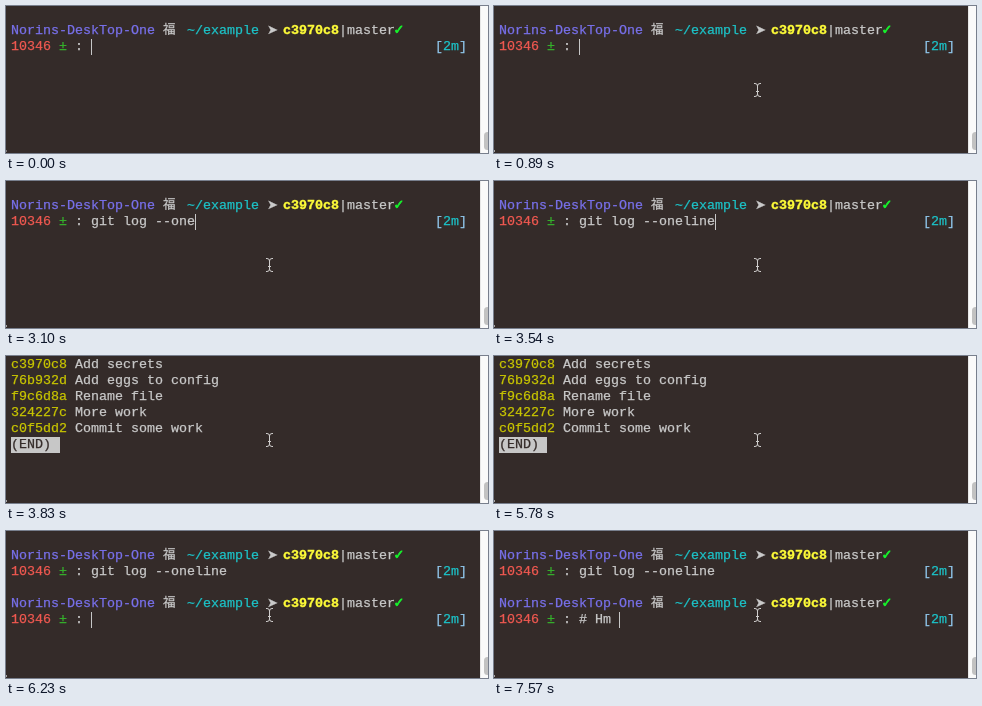
An HTML page for the animation above (8 s loop, 482x147 px).

```html
<!DOCTYPE html>
<html lang="en">
<head>
<meta charset="utf-8">
<title>Terminal session</title>
<style>
html, body { margin: 0; width: 100%; height: 100%; overflow: hidden; background: #342b29; }
svg { display: block; }
text { font: 13.333px "Liberation Mono", "Courier New", monospace; white-space: pre; stroke-width: .25px; }
.bold { font-weight: bold; stroke-width: .4px; }
.cjk { font: 500 12.5px "Noto Sans CJK JP", "Noto Sans CJK", sans-serif; }
.sym { font: 13px "DejaVu Sans", sans-serif; }
.check { font: bold 13px "DejaVu Sans", sans-serif; stroke-width: .8px; }
</style>
</head>
<body>
<svg id="stage" width="482" height="147" viewBox="0 0 482 147">
  <rect width="482" height="147" fill="#342b29"/>
  <rect x="474" width="8" height="147" fill="#fafafa"/>
  <rect x="474" width="1" height="147" fill="#e7e7e7"/>
  <rect x="478" y="126" width="10" height="18" rx="3.5" fill="#c2c2c2"/>
  <rect id="corner" y="144" width="1" height="2" fill="#c7c7c7"/>
  <g id="screen"></g>
  <path id="mouse" d="M260 77.5h1q2.5 0 2.5 2.5v8q0 2.5-2.5 2.5h-1M267 77.5h-1q-2.5 0-2.5 2.5v8q0 2.5 2.5 2.5h1M262 85.5h3" fill="none" stroke="#d0cecd"/>
  <rect id="caret" width="1" height="16" fill="#c7c7c7"/>
</svg>
<script>
const LOOP = 8000, CELL = 8, LINE = 16, LEFT = 5, TOP = 1;
const GREY = '#c9c9c9', YELLOW = '#c7c400', CYAN = '#1cc3c8', PALE = '#8fc6ea';
const $ = id => document.getElementById(id);
const colX = col => LEFT + col * CELL;
const rowY = row => TOP + row * LINE;

function text(col, row, str, color, cls = '') {
  return `<text x="${colX(col)}" y="${rowY(row) + 11}" fill="${color}" stroke="${color}" class="${cls}">${str}</text>`;
}

function prompt(row, command) {
  return text(0, row, 'Norins-DeskTop-One', '#7870ea')
    + text(19, row, '福', GREY, 'cjk')
    + text(22, row, '~/example', CYAN)
    + text(32, row, '➤', GREY, 'sym')
    + text(34, row, 'c3970c8', '#fdfb38', 'bold')
    + text(41, row, '|master', GREY)
    + text(47.8, row, '✓', '#16f32c', 'check')
    + text(0, row + 1, '10346', '#ee5850')
    + text(6, row + 1, '±', '#35b52c')
    + text(8, row + 1, ':', GREY)
    + text(10, row + 1, command, GREY)
    + text(53, row + 1, '[', PALE)
    + text(54, row + 1, '2m', CYAN)
    + text(56, row + 1, ']', PALE);
}

const log = [
  ['c3970c8', 'Add secrets'],
  ['76b932d', 'Add eggs to config'],
  ['f9c6d8a', 'Rename file'],
  ['324227c', 'More work'],
  ['c0f5dd2', 'Commit some work']
];
const pager = log.map(([hash, title], row) =>
  text(0, row, hash, YELLOW) + text(8, row, title, GREY)).join('')
  + `<rect x="${LEFT}" y="${rowY(5)}" width="48" height="16" fill="#c7c7c7"/>`
  + text(0, 5, '(END)', '#342b29');

const COMMAND = 'git log --oneline', COMMENT = '# Hm ';
// Keystrokes: [time, characters typed so far]
const commandKeys = [
  [1330, 1], [1480, 2], [1630, 4], [1780, 5], [1930, 6], [2080, 8], [2230, 10],
  [2530, 12], [3100, 13], [3240, 14], [3390, 16], [3540, 17]
];
const commentKeys = [[6530, 1], [7130, 2], [7280, 3], [7430, 4], [7570, 5]];

const typed = (keys, t) => keys.reduce((n, [at, count]) => t >= at ? count : n, 0);

function view(t) {
  if (t < 3830) {
    const n = typed(commandKeys, t);
    return [prompt(1, COMMAND.slice(0, n)), 10 + n, 2];
  }
  if (t < 6080) return [pager, 6, 5];
  const first = prompt(1, COMMAND);
  if (t < 6230) return [first, 0, 3];
  const n = typed(commentKeys, t);
  return [first + prompt(4, COMMENT.slice(0, n)), 10 + n, 5];
}

let shown;
function draw(now) {
  const t = now % LOOP;
  const [html, col, row] = view(t);
  if (html !== shown) $('screen').innerHTML = shown = html;
  const blink = (t >= 590 && t < 890) || (t >= 5780 && t < 6080);
  $('caret').setAttribute('x', colX(col));
  $('caret').setAttribute('y', rowY(row));
  $('caret').setAttribute('opacity', blink ? 0 : 1);
  $('mouse').setAttribute('opacity', t < 740 ? 0 : 1);
  $('corner').setAttribute('opacity', t < 300 ? 0.5 : 0.8);
  requestAnimationFrame(draw);
}
requestAnimationFrame(draw);
</script>
</body>
</html>
```
